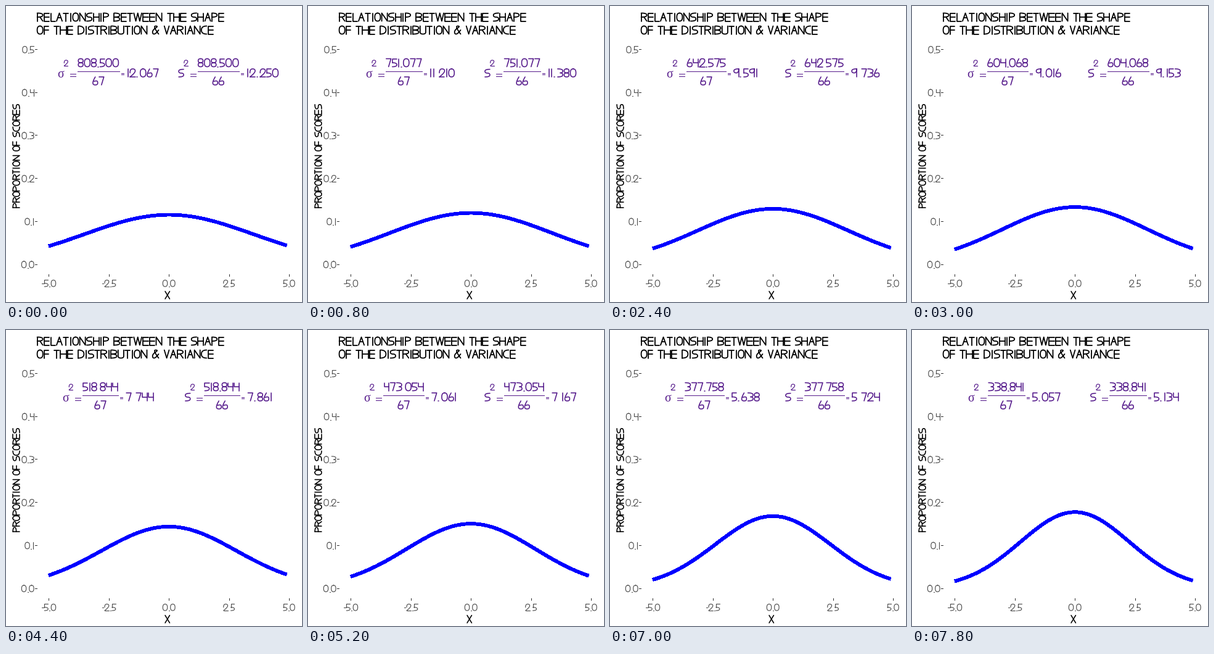
A matplotlib script for the animation above (8000 ms loop, 480x480 px).

```python
import numpy as np
import matplotlib.pyplot as plt
from matplotlib.animation import FuncAnimation
from matplotlib.collections import LineCollection

SIZE, DPI = 480, 100
FRAMES, STEP_MS = 40, 200
PT = 72 / DPI                      # points per pixel
CAP, BEARING = 13, 1.1             # capital height and side gap of a letter
PURPLE, GREY = "#551A8B", "#4D4D4D"
N = 67

# Pen strokes between anchors laid out like a keypad (7 top left, 3 bottom
# right); l, r, s, t sit a quarter in from the sides; "~" rounds the corners.
STROKES = {
    "0": "~871398", "1": "82", "2": "~47961 13", "3": "~7965 ~5631",
    "4": "746 93", "5": "974 ~4631", "6": "~841365l", "7": "792",
    "8": "~8746314698", "9": "~97469 93", ".": "st", "-": "46",
    "&": "~3794126", "A": "183 lr", "B": "17 ~7964 ~4631", "C": "~9713",
    "D": "17 ~7931", "E": "9713 46", "F": "971 46", "H": "71 93 46",
    "I": "82", "L": "713", "N": "1739", "O": "~871398", "P": "17 ~7964",
    "R": "17 ~7964 53", "S": "~974631", "T": "79 82", "U": "~741369",
    "V": "729", "W": "7s8t9", "X": "73 91", " ": "",
}
ANCHORS = {str(3 * row + col + 1): (col / 2, row / 2)
           for row in range(3) for col in range(3)}
ANCHORS |= {"l": (0.25, 0.45), "r": (0.75, 0.45), "s": (0.25, 0), "t": (0.75, 0)}

ADVANCE = {c: w for group, w in (("ABDHNORU0", 11.3), ("CEPS23", 10.6),
                                 ("46789TVX", 10), ("5FL", 9.5), (" ", 7),
                                 ("I-", 5), ("1", 4.5), (".", 4),
                                 ("&", 12), ("W", 15)) for c in group}


def rounded(pts):
    """Quadratic curves that join halfway between the inner points."""
    t = np.linspace(0, 1, 12)[:, None]
    start, out = pts[0], []
    for k in range(1, len(pts) - 1):
        last = k == len(pts) - 2
        end = pts[-1] if last else (pts[k] + pts[k + 1]) / 2
        out.append((1 - t) ** 2 * start + 2 * t * (1 - t) * pts[k] + t ** 2 * end)
        start = end
    return np.vstack(out)


def glyph(char):
    box = np.array([ADVANCE[char] - 2 * BEARING, CAP])
    for stroke in STROKES[char].split():
        pts = np.array([ANCHORS[a] for a in stroke.strip("~")]) * box
        yield (rounded(pts) if stroke[0] == "~" else pts) + (BEARING, 0)


def width(text, scale=1.0, dot=0.0):
    return scale * sum(ADVANCE[c] + dot * (c == ".") for c in text)


def write(text, x, y, scale=1.0, dot=0.0, upright=False):
    """Strokes of a text whose baseline starts at pixel (x, y)."""
    out, pen = [], 0
    for c in text:
        for s in glyph(c):
            along, up = scale * (s[:, 0] + pen), scale * s[:, 1]
            if upright:
                out.append(np.column_stack([x - up, y - along]))
            else:
                out.append(np.column_stack([x + along, y - up]))
        pen += ADVANCE[c] + dot * (c == ".")
    return out


fig = plt.figure(figsize=(SIZE / DPI, SIZE / DPI), dpi=DPI, facecolor="white")
ax = fig.add_axes([0, 0, 1, 1])
ax.set_xlim(0, SIZE)
ax.set_ylim(SIZE, 0)
ax.axis("off")


def strokes(segments, color, px, smooth=True):
    lines = LineCollection(segments, colors=color, linewidths=px * PT,
                           capstyle="round" if smooth else "butt",
                           joinstyle="round", antialiaseds=smooth)
    return ax.add_collection(lines, autolim=False)


def px_x(v):
    return 264.2 + 38.95 * v


def px_y(v):
    return 418.5 - 697 * v


# Title and axis names
strokes(write("RELATIONSHIP BETWEEN THE SHAPE", 49.5, 24.5)
        + write("OF THE DISTRIBUTION & VARIANCE", 49.5, 45.5), "black", 1.8)
strokes(write("PROPORTION OF SCORES", 22, 328, 0.83, upright=True)
        + write("X", 257, 475, 0.95), "black", 1.6)

# Ticks and their labels
labels, ticks = [], []
SMALL = 0.81
for k in range(6):
    y = px_y(k / 10)
    text = f"{k / 10:.1f}"
    labels += write(text, 46 - width(text, SMALL), y + 6, SMALL)
    ticks.append([(47, y), (50, y)])
for k in range(5):
    v = -5 + 2.5 * k
    text = f"{v:.1f}"
    x = px_x(v)
    labels += write(text, x - width(text, SMALL) / 2, 455, SMALL)
    ticks.append([(x, 435), (x, 438)])
strokes(labels, GREY, 1.15)
strokes(ticks, "#333333", 1, smooth=False)

# Density curve
xs = -5 + 0.15 * np.arange(N)
curve, = ax.plot([], [], color="blue", lw=4.8 * PT, antialiased=False,
                 solid_capstyle="butt", solid_joinstyle="round")

# Formulas
digits = strokes([], PURPLE, 1.6)
powers = strokes([], PURPLE, 1.2)
rules = strokes([], PURPLE, 1, smooth=False)
sigma = ax.text(0, 115.5, "σ", family="Liberation Serif", fontsize=20 * PT,
                color=PURPLE, va="baseline", ha="left")


def formula(center, total, n, lead):
    """Text strokes, power, ruled lines and left edge of one formula."""
    top, bottom, value = f"{total:.3f}", str(n), f"{total / n:.3f}"
    bar = width(top)
    left = center - (lead + bar + 12 + width(value, dot=2)) / 2
    x0 = left + lead
    x1 = x0 + bar
    text = write(top, x0, 98.5)
    text += write(bottom, (x0 + x1 - width(bottom)) / 2, 128)
    text += write(value, x1 + 12, 115, dot=2)
    power = write("2", x0 - 22.5, 97, 0.7)
    lines = [[(x0, 105.5), (x1, 105.5)]]
    lines += [[(x0 - 12, y), (x0 - 3, y)] for y in (109.5, 113.5)]
    lines += [[(x1 + 3, y), (x1 + 7, y)] for y in (108.5, 110.5)]
    return text, power, lines, left


def draw(i):
    sd = 3.5 - 2.5 * i / 79
    density = np.exp(-xs ** 2 / (2 * sd ** 2)) / (sd * np.sqrt(2 * np.pi))
    curve.set_data(px_x(xs), px_y(density) - 0.5)

    total = sd ** 2 * (N - 1)
    text_a, power_a, lines_a, left_a = formula(166, total, N, 32)
    text_b, power_b, lines_b, left_b = formula(361, total, N - 1, 31)
    sigma.set_x(left_a - 0.5)
    digits.set_segments(text_a + text_b + write("S", left_b - 0.5, 115, 0.95))
    powers.set_segments(power_a + power_b)
    rules.set_segments(lines_a + lines_b)
    return curve, digits, powers, rules, sigma


anim = FuncAnimation(fig, draw, frames=FRAMES, interval=STEP_MS,
                     init_func=lambda: draw(0), repeat=True, repeat_delay=0)
plt.show()
```
